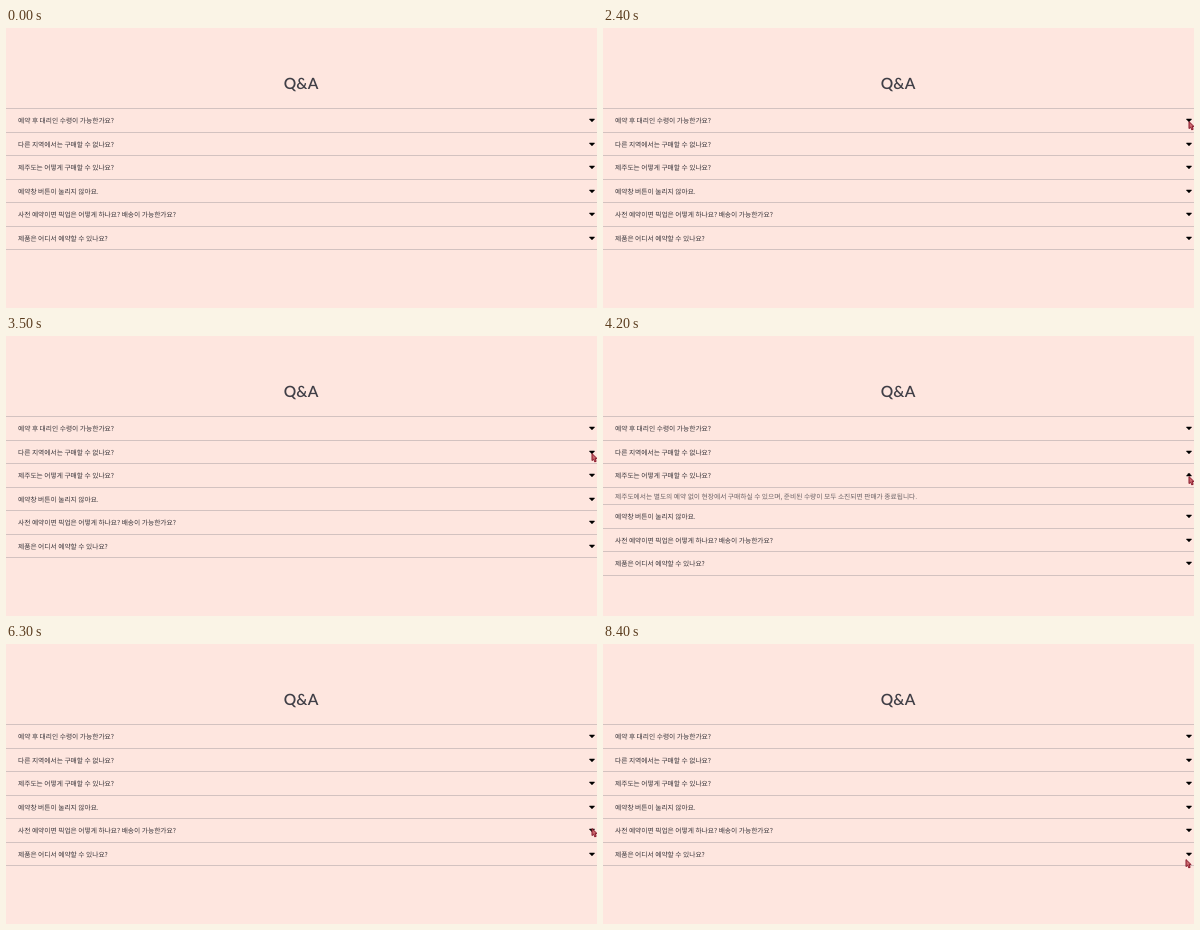
Recreate the animation shown at these times as an HTML page. Size 591x280 px, loop 8800 ms.

```html
<!DOCTYPE html>
<html>
<head>
<meta charset="utf-8">
<title>Q&amp;A</title>
<style>
@property --open { syntax: "<integer>"; inherits: true; initial-value: 0; }

:root { --line: #d3c2c0; }

html, body {
  margin: 0;
  width: 100%;
  height: 100%;
  overflow: hidden;
  background: #fee6df;
}

body {
  position: relative;
  font: 6.74px/13px "Noto Sans CJK KR", "Noto Sans CJK JP", "Noto Sans CJK", sans-serif;
  color: #37343a;
  text-rendering: geometricPrecision;
}

h1 {
  position: absolute;
  left: 0;
  top: 46px;
  width: 590px;
  margin: 0;
  font: 600 15.5px/21px Lato, sans-serif;
  color: #403f47;
  text-align: center;
}

.list {
  position: absolute;
  left: 0;
  top: 80.3px;
  width: 591px;
  border-bottom: 1px solid var(--line);
  animation: open 8.8s step-end infinite;
}

.item {
  --gap: max(var(--open) - var(--i), var(--i) - var(--open));
  --on: max(0, 1 - var(--gap));
  --h: 17.5px;
}
.item.tall { --h: 30.5px; }

.q {
  position: relative;
  box-sizing: border-box;
  height: 23.5px;
  padding-left: 12px;
  border-top: 1px solid var(--line);
  line-height: 23px;
  white-space: nowrap;
}

.q svg {
  position: absolute;
  left: 583px;
  top: 9.1px;
  width: 6px;
  height: 4px;
  overflow: visible;
  transform: scaleY(calc(1 - 2 * var(--on)));
}

.a {
  height: calc(var(--h) * var(--on));
  overflow: hidden;
}
.a p {
  margin: 0;
  padding: 2.2px 0 0 12px;
  border-top: 1px solid var(--line);
  color: #686064;
  white-space: nowrap;
}

.cursor {
  position: absolute;
  left: 0;
  top: 0;
  width: 7px;
  height: 10px;
  overflow: visible;
  animation: move 8.8s step-end infinite;
}

/* number of the open item, 0 for none */
@keyframes open {
  0% { --open: 0; }
  19.31% { --open: 1; }
  27.27% { --open: 0; }
  34.09% { --open: 2; }
  39.77% { --open: 0; }
  47.72% { --open: 3; }
  53.4% { --open: 0; }
  60.22% { --open: 4; }
  68.18% { --open: 0; }
  73.86% { --open: 5; }
  79.54% { --open: 0; }
  86.36% { --open: 6; }
  93.18%, 100% { --open: 0; }
}

@keyframes move {
  0% { transform: translate(600px, 150px); }
  10.22% { transform: translate(588px, 136px); }
  11.36% { transform: translate(587px, 112px); }
  12.49% { transform: translate(586px, 98px); }
  13.63% { transform: translate(586px, 93px); }
  29.54% { transform: translate(586px, 100px); }
  30.68% { transform: translate(586px, 110px); }
  31.81% { transform: translate(586px, 117px); }
  43.18% { transform: translate(586px, 122px); }
  44.31% { transform: translate(586px, 130px); }
  45.45% { transform: translate(586px, 137px); }
  46.59% { transform: translate(586px, 140px); }
  55.68% { transform: translate(586px, 146px); }
  56.81% { transform: translate(586px, 154px); }
  57.95% { transform: translate(585px, 160px); }
  59.09% { transform: translate(585px, 162px); }
  69.31% { transform: translate(585px, 168px); }
  70.45% { transform: translate(586px, 177px); }
  71.59% { transform: translate(586px, 184px); }
  72.72% { transform: translate(586px, 187px); }
  82.95% { transform: translate(586px, 196px); }
  84.09% { transform: translate(586px, 206px); }
  85.22% { transform: translate(586px, 211px); }
  94.31% { transform: translate(584px, 214px); }
  95.45%, 100% { transform: translate(583px, 215px); }
}
</style>
</head>
<body>
<h1>Q&amp;A</h1>
<div class="list"></div>
<svg class="cursor" viewBox="0 0 7 10">
  <path d="M0 .6V7.6L1.6 6.2 2.8 8.9 4.2 8.3 3 5.7H5.2Z" fill="#cc686e" stroke="#86182a" stroke-width="1" stroke-linejoin="round"/>
</svg>
<script>
const items = [
  ["예약 후 대리인 수령이 가능한가요?",
   "예약자 본인 명의의 신분증을 지참하시거나, 기타 방법을 통해 예약내역을 확인할 수 있는 경우에 한하여 대리 수령이 가능합니다."],
  ["다른 지역에서는 구매할 수 없나요?",
   "현재는 안내된 지역의 매장에서만 구매하실 수 있습니다. 다른 지역의 판매 일정은 아직 정해지지 않았습니다.<br>판매 지역이 추가되는 경우 홈페이지를 통해 안내해 드리겠습니다."],
  ["제주도는 어떻게 구매할 수 있나요?",
   "제주도에서는 별도의 예약 없이 현장에서 구매하실 수 있으며, 준비된 수량이 모두 소진되면 판매가 종료됩니다."],
  ["예약창 버튼이 눌리지 않아요.",
   "달숲맥주 오크시리즈 : 루메브 아티장 쇼콜라티에 에디션은 한정수량만 생산 판매되어, 정해진 시간에 정해진 수량만 예약이 오픈됩니다. 수량이 모두 소진되면 예약은 조기 종료될 수 있습니다."],
  ["사전 예약이면 픽업은 어떻게 하나요? 배송이 가능한가요?",
   "예약하신 매장에서 직접 수령하셔야 하며, 배송은 가능하지 않습니다. 방문하실 때 예약내역을 확인해 주시기 바랍니다."],
  ["제품은 어디서 예약할 수 있나요?",
   "홈페이지의 예약 페이지에서 매장과 수량을 선택하신 후 예약하실 수 있습니다."]
];

const caret = '<svg viewBox="0 0 6 4"><path d="M.6 .7H5.4Q6 .9 5.6 1.4L3.4 3.7Q3 4.1 2.6 3.7L.4 1.4Q0 .9 .6 .7Z"/></svg>';

document.querySelector(".list").innerHTML = items.map(([q, a], i) =>
  `<div class="item${a.includes("<br>") ? " tall" : ""}" style="--i:${i + 1}">
    <div class="q">${q}${caret}</div>
    <div class="a"><p>${a}</p></div>
  </div>`).join("");
</script>
</body>
</html>
```
